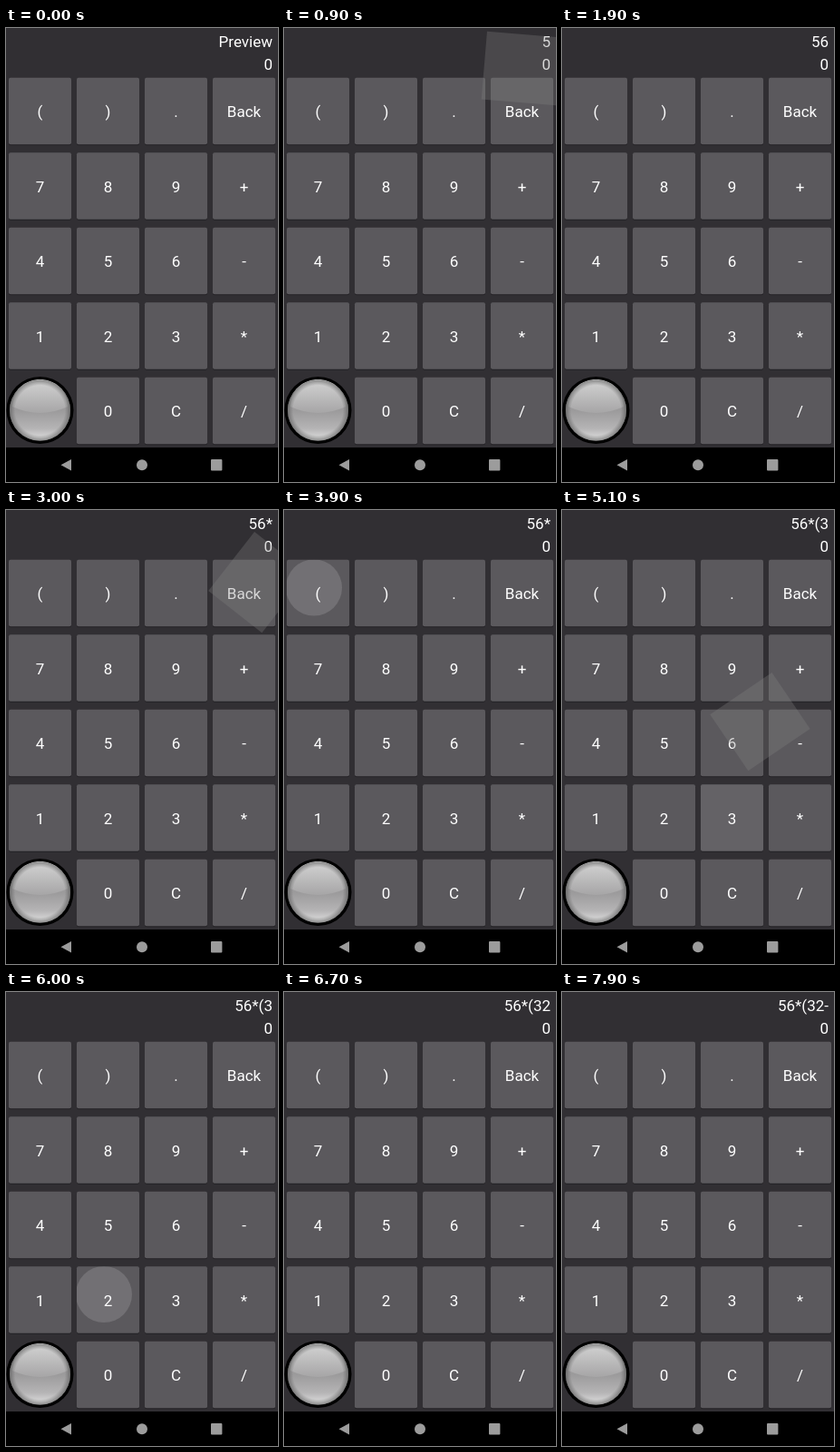
An HTML page that plays this animation: 300x500 px, repeating every 8 s.

```html
<!DOCTYPE html>
<html lang="en">
<head>
<meta charset="utf-8">
<title>Calculator</title>
<style>
html, body { margin: 0; width: 100%; height: 100%; overflow: hidden; background: #312f33; }
svg { display: block; width: 100%; height: 100%; }
text { font: 17px Roboto, sans-serif; fill: #fff; }
#keys text { text-anchor: middle; }
.out { text-anchor: end; }
</style>
</head>
<body>
<svg viewBox="0 0 300 500">
  <defs>
    <linearGradient id="body" x2="0" y2="1">
      <stop offset="0" stop-color="#aaa"/>
      <stop offset=".5" stop-color="#9b9a9b"/>
      <stop offset=".8" stop-color="#b5b4b5"/>
      <stop offset="1" stop-color="#e2e2e2"/>
    </linearGradient>
    <linearGradient id="gloss" x2="0" y2="1">
      <stop offset="0" stop-color="#dedede"/>
      <stop offset="1" stop-color="#a9a8a9"/>
    </linearGradient>
    <radialGradient id="rim">
      <stop offset=".82" stop-color="#555" stop-opacity="0"/>
      <stop offset="1" stop-color="#555" stop-opacity=".6"/>
    </radialGradient>
    <clipPath id="clip"><rect id="clipBox" width="69" height="73.5" rx="2"/></clipPath>
  </defs>
  <rect width="300" height="500" fill="#312f33"/>
  <text id="preview" class="out" x="294" y="20.5"></text>
  <text class="out" x="294" y="45.5">0</text>
  <g id="keys"></g>
  <g clip-path="url(#clip)"><circle id="ripple" fill="#fff"/></g>
  <g id="labels"></g>
  <circle cx="37.5" cy="421" r="37" fill="#000"/>
  <circle cx="37.5" cy="421" r="33.5" fill="url(#body)"/>
  <path d="M7 417C8 377 67 377 68 417Q37.5 431 7 417Z" fill="url(#gloss)" opacity=".8"/>
  <circle cx="37.5" cy="421" r="33.5" fill="url(#rim)"/>
  <rect y="462" width="300" height="38"/>
  <g fill="#9c9c9c">
    <path d="M60.5 481.3L72 475V487.6Z"/>
    <circle cx="150" cy="481.3" r="6"/>
    <rect x="226" y="475" width="12.4" height="12.4" rx="1"/>
  </g>
  <rect id="tile" x="-37.5" y="-41.25" width="75" height="82.5" fill="#808080" fill-opacity=".31"/>
</svg>
<script>
const LOOP = 8000, STEP = 100, FLIGHT = 500;
const TARGET = { x: 282, y: 16 };
const ROWS = [['(', ')', '.', 'Back'], ['7', '8', '9', '+'], ['4', '5', '6', '-'],
              ['1', '2', '3', '*'], ['', '0', 'C', '/']];
// key, touch time, delay until the tile takes off
const PRESSES = [['5', 500, 72], ['6', 1300, 72], ['*', 2600, 122], ['(', 3900, 101],
                 ['3', 4900, 110], ['2', 6000, 110], ['-', 7200, 110]];

const $ = id => document.getElementById(id);
const set = (el, attrs) => { for (const k in attrs) el.setAttribute(k, attrs[k]); };
function add(parent, tag, attrs, text = '') {
  const el = document.createElementNS('http://www.w3.org/2000/svg', tag);
  set(el, attrs);
  el.textContent = text;
  parent.append(el);
}

const centers = {};
ROWS.forEach((row, r) => row.forEach((label, c) => {
  if (!label) return;
  const x = 37.5 + 75 * c, y = 91.5 + 82.5 * r;
  centers[label] = { x, y };
  const box = { x: x - 34.5, y: y - 36.7, width: 69, height: 73.5, rx: 2 };
  add($('keys'), 'rect', { ...box, y: box.y + 1, fill: '#222024' });
  add($('keys'), 'rect', { ...box, fill: '#5b595d' });
  add($('labels'), 'text', { x, y: y + 6.5, 'text-anchor': 'middle' }, label);
}));

function drawRipple(key, age) {
  const live = age >= 0 && age < 300;
  $('ripple').style.display = live ? '' : 'none';
  if (!live) return;
  const { x, y } = centers[key];
  const grow = Math.min(1, age / 150);
  set($('clipBox'), { x: x - 34.5, y: y - 36.7 });
  set($('ripple'), {
    cx: x - 4.5 * (1 - grow), cy: y - 6 * (1 - grow),
    r: 31 + 20 * grow,
    'fill-opacity': 0.14 * (1 - Math.max(0, age - 50) / 250)
  });
}

function drawTile(key, age) {
  const live = age >= 0 && age < FLIGHT;
  $('tile').style.display = live ? '' : 'none';
  if (!live) return;
  const from = centers[key];
  const p = 1 - (1 - age / FLIGHT) ** 2;
  const x = from.x + (TARGET.x - from.x) * p;
  const y = from.y + (TARGET.y - from.y) * p;
  set($('tile'), { transform: `translate(${x} ${y}) rotate(${720 * p})` });
}

function draw(time) {
  const t = Math.floor(time % LOOP / STEP) * STEP;
  const typed = PRESSES.filter(([, at, delay]) => t >= at + delay).map(p => p[0]).join('');
  $('preview').textContent = typed || 'Preview';
  const [key, at, delay] = PRESSES.filter(p => t >= p[1]).pop() || PRESSES[0];
  drawRipple(key, t - at);
  drawTile(key, t - at - delay);
}

const start = performance.now();
function tick() {
  draw(performance.now() - start);
  requestAnimationFrame(tick);
}
tick();
</script>
</body>
</html>
```
